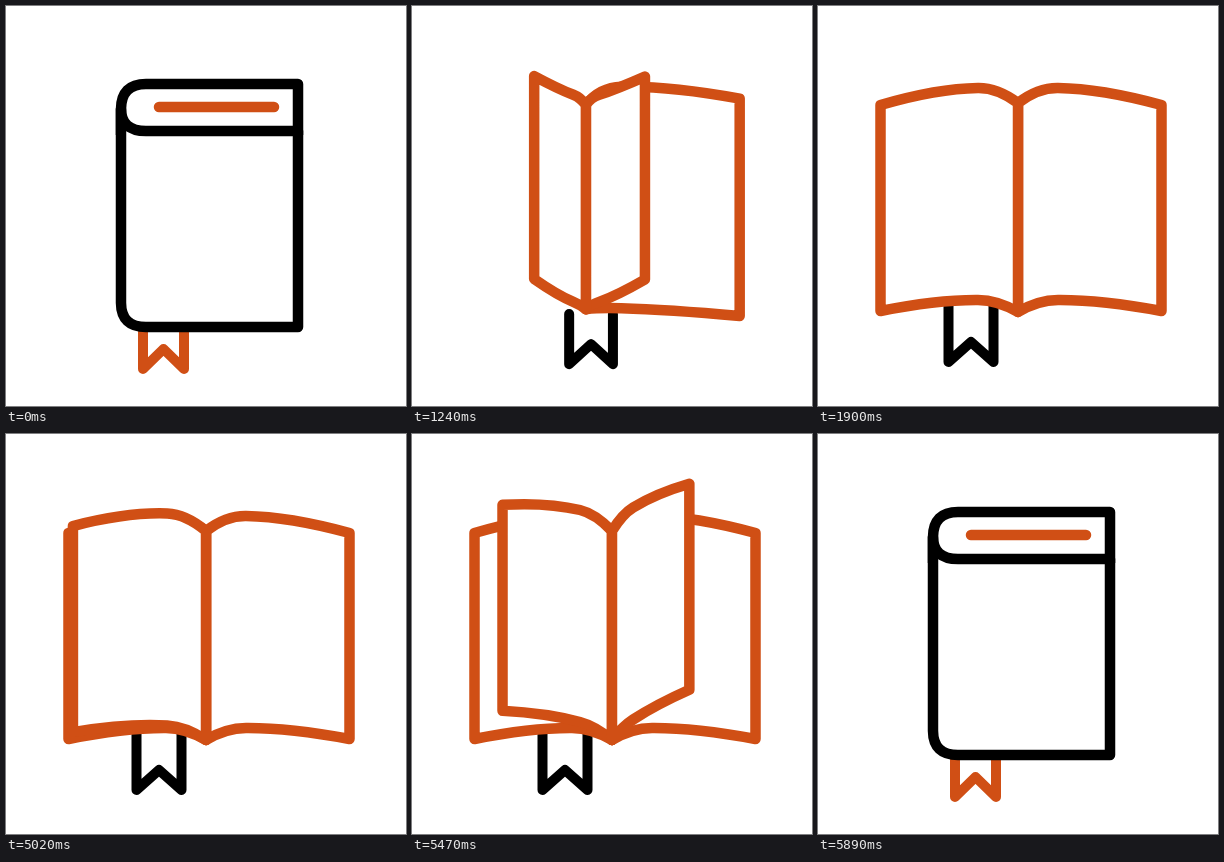
An HTML page with a canvas for the animation above (5920 ms loop, 400 by 400 pixels).

```html
<!DOCTYPE html>
<html lang="en">
<head>
<meta charset="utf-8">
<title>Book</title>
<style>
html, body { margin: 0; width: 100%; height: 100%; overflow: hidden; background: #fff; }
canvas { display: block; width: 400px; height: 400px; }
</style>
</head>
<body>
<canvas width="400" height="400"></canvas>
<script>
const ctx = document.querySelector('canvas').getContext('2d');
const ORANGE = '#d04f15', BLACK = '#000';
const LOOP = 5920, STEP = 30, OPEN_END = 900;
const PAGE_STARTS = [82, 280, 480], PAGE_SPEED = 0.43;

const clamp = (v, lo, hi) => Math.min(hi, Math.max(lo, v));
const lerp = (a, b, k) => a + (b - a) * k;
const smooth = k => k * k * (3 - 2 * k);

// Position on the opening timeline: 0 is closed, 900 is open.
function progressAt(time) {
  if (time < 1000) return 0;
  if (time < 5020) return Math.min(OPEN_END, STEP * Math.floor((time - 1000) / STEP));
  return Math.max(0, 865 - STEP * Math.floor((time - 5020) / STEP));
}

// Outline of a leaf turned by `degrees`; `open` blends closed and open book.
function leafPath(degrees, open, closedTop) {
  const angle = degrees * Math.PI / 180;
  const cos = Math.cos(angle), sin = Math.max(0, Math.sin(angle));
  const spineX = lerp(115, 200, open);
  const midX = spineX + lerp(25, 40, open) * cos;
  const tipX = spineX + 3 * open + lerp(177, 140.5, open) * cos;
  const lift = 64 * open * Math.pow(sin, 1.6);
  const sag = 10 * sin * (1 - open);
  const edge = (spine, mid, tip) => {
    const dx = tipX - spineX, dy = (tip - spine) * open;
    return {
      spine, mid, tip,
      inner: [midX - 0.14 * dx, mid - 0.14 * dy],
      outer: [midX + 0.3 * dx, mid + 0.3 * dy]
    };
  };
  const top = edge(lerp(103, 97, open),
    lerp(closedTop, 82 - 10 * sin, open),
    lerp(closedTop, 99, open) - lift + sag);
  const bottom = edge(lerp(297, 306, open),
    lerp(321, 294 - 10 * sin, open),
    lerp(321, 305, open) - lift + sag);
  const path = new Path2D();
  path.moveTo(spineX, top.spine);
  path.quadraticCurveTo(...top.inner, midX, top.mid);
  path.quadraticCurveTo(...top.outer, tipX, top.tip);
  path.lineTo(tipX, bottom.tip);
  path.quadraticCurveTo(...bottom.outer, midX, bottom.mid);
  path.quadraticCurveTo(...bottom.inner, spineX, bottom.spine);
  path.closePath();
  return path;
}

function drawLeaf(path, color) {
  ctx.strokeStyle = color;
  ctx.fill(path);
  ctx.stroke(path);
}

function strokeLine(d, color) {
  ctx.strokeStyle = color;
  ctx.stroke(new Path2D(d));
}

function drawBookmark(open, color) {
  const x = lerp(137, 130.5, open) + 30 * Math.sin(Math.PI * open);
  const top = lerp(326, 300, open), low = lerp(363, 356, open);
  const width = lerp(41, 45, open);
  strokeLine(`M${x} ${top}V${low}L${x + width / 2} ${low - 20}L${x + width} ${low}V${top}`, color);
}

function drawBack(progress, open) {
  const path = leafPath(0, open, 78);
  if (progress >= 75) return drawLeaf(path, ORANGE);
  ctx.save();
  ctx.beginPath();
  ctx.rect(0, 0, 400, 129);
  ctx.clip();
  drawLeaf(path, BLACK);
  ctx.restore();
  if (!progress) return strokeLine('M153 101H268', ORANGE);
  const x = lerp(292, 343, open);
  strokeLine('M128 107Q136 99 148 99L268 101V124', ORANGE);
  strokeLine(`M${x} 153V281`, ORANGE);
}

function draw(progress) {
  const open = smooth(clamp(progress / 380, 0, 1));
  const turn = clamp(progress / 390, 0, 1) * 180;
  const coverColor = turn < 90 ? BLACK : ORANGE;
  ctx.clearRect(0, 0, 400, 400);
  ctx.fillStyle = '#fff';
  ctx.lineCap = ctx.lineJoin = 'round';
  ctx.lineWidth = 10;
  drawBookmark(open, turn < 90 ? ORANGE : BLACK);
  ctx.lineWidth = 10.5;
  drawBack(progress, open);

  const leaves = [{ angle: turn, color: coverColor }];
  for (const start of PAGE_STARTS) {
    const angle = (progress - start) * PAGE_SPEED;
    if (angle > 0 && angle < 180) leaves.push({ angle, color: ORANGE });
  }
  // Leaves nearest to upright lie on top.
  const flatness = leaf => Math.abs(leaf.angle - 90);
  leaves.sort((a, b) => flatness(b) - flatness(a));
  for (const { angle, color } of leaves) drawLeaf(leafPath(angle, open, 125), color);
}

const startTime = performance.now();
function tick() {
  draw(progressAt((performance.now() - startTime) % LOOP));
  requestAnimationFrame(tick);
}
tick();
</script>
</body>
</html>
```
